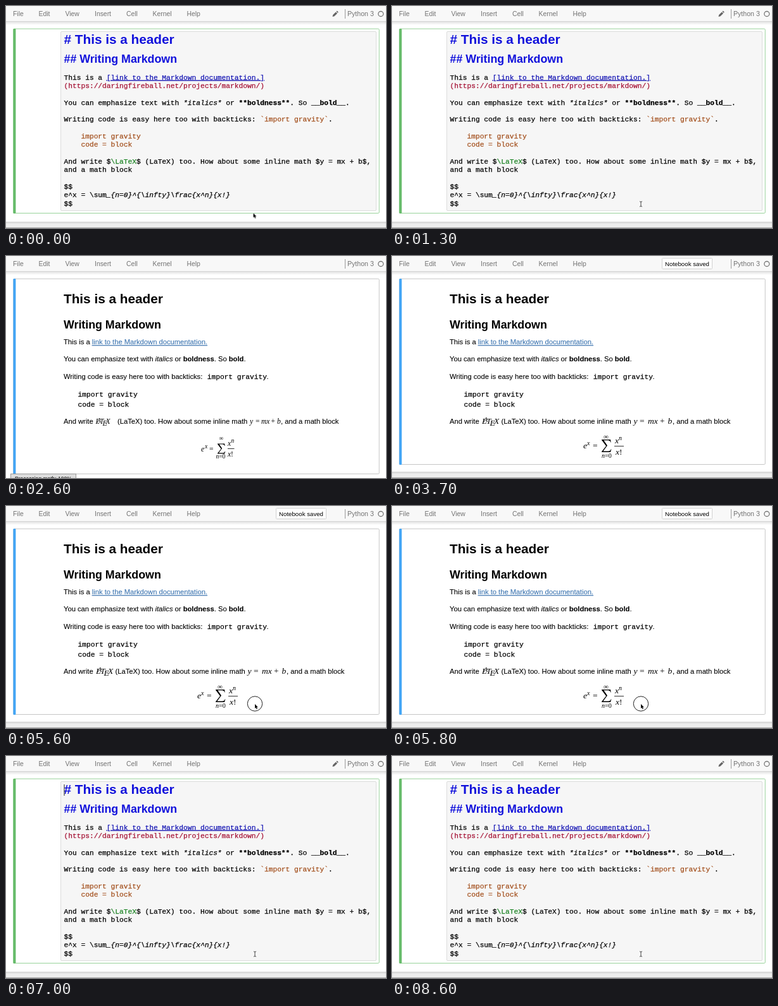
An HTML page for the animation above (8900 ms loop, 600x352 px).

```html
<!DOCTYPE html>
<html lang="en">
<head>
<meta charset="utf-8">
<title>Markdown cell</title>
<style>
html, body { margin: 0; width: 100%; height: 100%; overflow: hidden; background: #fff; }
svg { display: block; width: 600px; height: 352px; }
text { white-space: pre; font-family: "Liberation Sans", Arial, sans-serif; fill: currentColor; }
.menu text { font-size: 10.4px; color: #737373; }
.mono text, .prose text.code {
  font-family: "Liberation Mono", "Courier New", monospace;
  font-size: 11.22px;
  stroke: currentColor;
  stroke-width: .25px;
}
.prose text { font-size: 11.2px; stroke: currentColor; stroke-width: .1px; }
.mono text.h1, .prose text.h1 { font: bold 20.75px "Liberation Sans", Arial, sans-serif; stroke: none; }
.mono text.h2, .prose text.h2 { font: bold 17.8px "Liberation Sans", Arial, sans-serif; stroke: none; }
.mono .h1, .mono .h2 { color: #1111dc; }
.b { font-weight: bold; }
.i { font-style: italic; }
.link { color: #1414b4; text-decoration: underline; }
.mono .url { color: #a51134; }
.mono .tick { color: #a34f1c; }
.tex { color: #17801f; }
.link, .tick, .tex, .anchor { fill: currentColor; stroke: currentColor; }
.anchor { color: #3b73af; text-decoration: underline; }
.math text { font-family: "Liberation Serif", "Times New Roman", serif; font-size: 13.5px; }
.math .small { font-size: 10px; }
.loose text { font-size: 11.5px; }
.loose .small { font-size: 9.5px; }

/* One loop is 8900 ms; everything but the pointer path switches hard. */
.edit, .view, .early, .final, .status, .busy, .caret, .arrow, .beam, .ring {
  animation: 8900ms step-end infinite;
}
.edit { animation-name: edit; }
.view { animation-name: view; }
.early { animation-name: early; }
.final { animation-name: final; }
.status { animation-name: status; }
.busy { animation-name: busy; }
.caret { animation-name: caret; }
.arrow { animation-name: arrow; }
.beam { animation-name: beam; }
.ring { animation-name: ring; }
.pointer { animation: glide 8900ms linear infinite; }

@keyframes edit { 0%, 66.29% { opacity: 1 } 29.21% { opacity: 0 } 100% { opacity: 1 } }
@keyframes view { 0%, 66.29% { opacity: 0 } 29.21% { opacity: 1 } 100% { opacity: 0 } }
@keyframes early { 0%, 31.46% { opacity: 0 } 29.21% { opacity: 1 } 100% { opacity: 0 } }
@keyframes final { 0%, 66.29% { opacity: 0 } 31.46% { opacity: 1 } 100% { opacity: 0 } }
@keyframes busy { 0%, 37.07% { opacity: 0 } 29.21% { opacity: 1 } 100% { opacity: 0 } }
@keyframes status {
  0%, 66.29%, 100% { opacity: 0 }
  40.44% { opacity: .45 }
  41.57% { opacity: 1 }
}
@keyframes caret {
  0%, 8.98%, 21.34%, 29.21%, 71.9%, 84.26%, 95.5%, 100% { opacity: 0 }
  3.37%, 15.73%, 26.96%, 66.29%, 77.52%, 89.88% { opacity: 1 }
}
@keyframes arrow { 0%, 62.92% { opacity: 1 } 1.12%, 66.29% { opacity: 0 } 100% { opacity: 0 } }
@keyframes beam { 0%, 29.21% { opacity: 0 } 1.12%, 66.29% { opacity: 1 } 100% { opacity: 1 } }
@keyframes ring { 0%, 66.29% { opacity: 0 } 62.92% { opacity: 1 } 100% { opacity: 0 } }
@keyframes glide {
  0% { transform: translate(390.5px, 328.5px); animation-timing-function: ease-out }
  4.49%, 100% { transform: translate(393px, 314px) }
}
</style>
</head>
<body>
<svg viewBox="0 0 600 352">
  <defs>
    <linearGradient id="shade" x2="0" y2="1">
      <stop stop-color="#d2d2d2"/>
      <stop offset="1" stop-color="#eee"/>
    </linearGradient>
    <linearGradient id="fade" x2="0" y2="1">
      <stop stop-color="#dedede"/>
      <stop offset="1" stop-color="#fff"/>
    </linearGradient>
    <path id="sigma" d="M0 0H14L14.6 4.4H14Q13.2 1.2 10 1.2H3.3L9 9.4L2.4 18.4H10.5Q13.6 18.4 14.8 15.2H15.4L14 20H0V19.2L7 10.3L0 .8Z"/>
    <g id="footer">
      <rect y="342" width="600" height="10" fill="#eee"/>
      <rect y="342" width="600" height="4" fill="url(#shade)"/>
      <rect y="351" width="600" height="1" fill="#a8a8a8"/>
    </g>
  </defs>

  <rect width="600" height="352" fill="#fff"/>
  <rect width="600" height="24" fill="#f8f8f8"/>
  <rect y="24" width="600" height="6" fill="url(#fade)"/>
  <rect y="24" width="600" height="1" fill="#d4d4d4"/>
  <g class="menu">
    <text x="11" y="16.3">File</text>
    <text x="51.5" y="16.3">Edit</text>
    <text x="93.5" y="16.3">View</text>
    <text x="140" y="16.3">Insert</text>
    <text x="190" y="16.3">Cell</text>
    <text x="231.5" y="16.3">Kernel</text>
    <text x="285.5" y="16.3">Help</text>
    <text x="539" y="16.3" style="font-size:10.6px">Python 3</text>
    <path d="M535.5 5V20" stroke="#999"/>
    <circle cx="591.8" cy="12.5" r="4" fill="none" stroke="#777" stroke-width="1.3"/>
  </g>

  <g class="edit">
    <use href="#footer"/>
    <path d="M515.5 17L516.2 14L520.8 9.4L523.1 11.7L518.5 16.3ZM521.5 8.7L522.2 8Q522.8 7.6 523.4 8.2L524.3 9.1Q524.9 9.7 524.4 10.3L523.8 11Z" fill="#666"/>
    <rect x="11.8" y="36.2" width="577.4" height="292.3" rx="1.5" fill="#fff" stroke="#98d29a"/>
    <rect x="11.4" y="36" width="4" height="293" rx="1" fill="#66bb6a"/>
    <rect x="86.5" y="40.5" width="498" height="284" rx="1.5" fill="#f6f6f6" stroke="#dcdcdc"/>
    <g class="mono">
      <text class="h1" x="91.5" y="59.8"># This is a header</text>
      <text class="h2" x="91.5" y="90.2">## Writing Markdown</text>
      <text x="91.5" y="116.7">This is a <tspan class="link">[link to the Markdown documentation.]</tspan></text>
      <text class="url" x="91.5" y="130">(https://daringfireball.net/projects/markdown/)</text>
      <text x="91.5" y="156.7">You can emphasize text with <tspan class="i">*italics*</tspan> or <tspan class="b">**boldness**</tspan>. So <tspan class="b">__bold__</tspan>.</text>
      <text x="91.5" y="183.4">Writing code is easy here too with backticks: <tspan class="tick">`import gravity`</tspan>.</text>
      <text class="tick" x="91.5" y="210">    import gravity</text>
      <text class="tick" x="91.5" y="223.3">    code = block</text>
      <text x="91.5" y="250">And write $<tspan class="tex">\LaTeX</tspan>$ (LaTeX) too. How about some inline math $y = mx + b$,</text>
      <text x="91.5" y="263.3">and a math block</text>
      <text x="91.5" y="290">$$</text>
      <text x="91.5" y="303.3">e^x = \sum<tspan class="i">_{n=0}^{\infty}\frac{x^n}{x!}</tspan></text>
      <text x="91.5" y="316.6">$$</text>
    </g>
  </g>
  <path class="caret" d="M92 45V63" stroke="#222" stroke-width="1"/>

  <g class="view">
    <g class="final">
      <use href="#footer"/>
      <rect x="11.8" y="36.2" width="577.4" height="294.3" rx="1.5" fill="#fff" stroke="#c6c6c6"/>
      <rect x="11.4" y="36" width="4" height="295" rx="1" fill="#42a5f5"/>
    </g>
    <g class="early">
      <rect x="11.8" y="36.2" width="577.4" height="309.3" rx="1.5" fill="#fff" stroke="#c6c6c6"/>
      <rect x="11.4" y="36" width="4" height="310" rx="1" fill="#42a5f5"/>
    </g>
    <g class="prose">
      <text class="h1" x="91" y="75.3">This is a header</text>
      <text class="h2" x="91" y="115.3">Writing Markdown</text>
      <text x="91" y="140.2">This is a <tspan class="anchor">link to the Markdown documentation.</tspan></text>
      <text x="91" y="167.4">You can emphasize text with <tspan class="i">italics</tspan> or <tspan class="b">boldness</tspan>. So <tspan class="b">bold</tspan>.</text>
      <text x="91" y="195.2">Writing code is easy here too with backticks: </text>
      <text class="code" x="317.7" y="195.2">import gravity</text>
      <text x="411.5" y="195.2">.</text>
      <text class="code" x="113.5" y="222.6">import gravity</text>
      <text class="code" x="113.5" y="238.6">code = block</text>
      <text x="91" y="266">And write</text>
    </g>

    <g class="early">
      <g class="prose">
        <text x="176" y="266">(LaTeX) too. How about some inline math</text>
        <text x="434" y="266">, and a math block</text>
      </g>
      <g class="math loose">
        <text class="i" y="266"><tspan x="141.5">L</tspan><tspan class="small" x="144" y="264">A</tspan><tspan x="148" y="266">T</tspan><tspan x="152.5" y="268.5">E</tspan><tspan x="157.5" y="266">X</tspan></text>
        <text class="i" y="266"><tspan x="385">y</tspan><tspan x="403">mx</tspan><tspan x="428">b</tspan></text>
        <text y="266"><tspan x="394">=</tspan><tspan x="418.5">+</tspan></text>
        <text class="i" x="308" y="310">e</text>
        <text class="i small" x="314" y="305">x</text>
        <text x="321" y="310">=</text>
        <use href="#sigma" transform="translate(334 297.5) scale(.8)"/>
        <text class="small" x="336.5" y="292">∞</text>
        <text class="small" x="331.5" y="321.3"><tspan class="i">n</tspan>=0</text>
        <text class="i" x="350" y="301">x</text>
        <text class="i small" x="355.5" y="296">n</text>
        <path d="M350 305.5H360.5" stroke="#000" stroke-width=".8"/>
        <text x="350" y="318"><tspan class="i">x</tspan>!</text>
      </g>
    </g>

    <g class="final">
      <g class="prose">
        <text x="172.5" y="266">(LaTeX) too. How about some inline math</text>
        <text x="443" y="266">, and a math block</text>
      </g>
      <g class="math">
        <text class="i" y="266"><tspan x="142">L</tspan><tspan class="small" x="145" y="263.3">A</tspan><tspan x="149" y="266">T</tspan><tspan x="154.5" y="269">E</tspan><tspan x="161" y="266">X</tspan></text>
        <text class="i" y="266"><tspan x="381.5">y</tspan><tspan x="404">mx</tspan><tspan x="435.5">b</tspan></text>
        <text y="266"><tspan x="391">=</tspan><tspan x="423">+</tspan></text>
        <text class="i" x="302" y="304.5">e</text>
        <text class="i small" x="308" y="299.5">x</text>
        <text x="317" y="304.5">=</text>
        <use href="#sigma" transform="translate(331 291)"/>
        <text class="small" x="334" y="289.5" style="font-size:11px">∞</text>
        <text class="small" x="331" y="319.5"><tspan class="i">n</tspan>=0</text>
        <text class="i" x="352" y="296.5">x</text>
        <text class="i small" x="358" y="291.5">n</text>
        <path d="M351 301.5H366" stroke="#000" stroke-width=".8"/>
        <text x="353" y="314.5"><tspan class="i">x</tspan>!</text>
      </g>
    </g>

    <g class="busy">
      <rect x="7.5" y="345.5" width="103" height="12" fill="#ddd" stroke="#999"/>
      <text x="14" y="356.3" style="font-size:8.5px">Processing math: 100%</text>
    </g>
    <g class="status">
      <rect x="426.5" y="3.5" width="79" height="17" rx="1" fill="#fff" stroke="#d0d0d0"/>
      <text x="431" y="15.8" style="font-size:9.7px">Notebook saved</text>
    </g>
  </g>

  <circle class="ring" cx="393" cy="313.5" r="11.7" fill="none" stroke="#222" stroke-width="1"/>
  <g class="pointer">
    <path class="arrow" d="M0 0V7L1.6 5.6L2.7 8.2L3.9 7.7L2.8 5.2H4.9Z" fill="#000" stroke="#fff" stroke-width="1" paint-order="stroke"/>
    <path class="beam" d="M-2 -4Q0 -4 0 -3Q0 -4 2 -4M0 -3V3M-2 4Q0 4 0 3Q0 4 2 4" fill="none" stroke="#333" stroke-width=".9"/>
  </g>
</svg>
</body>
</html>
```
